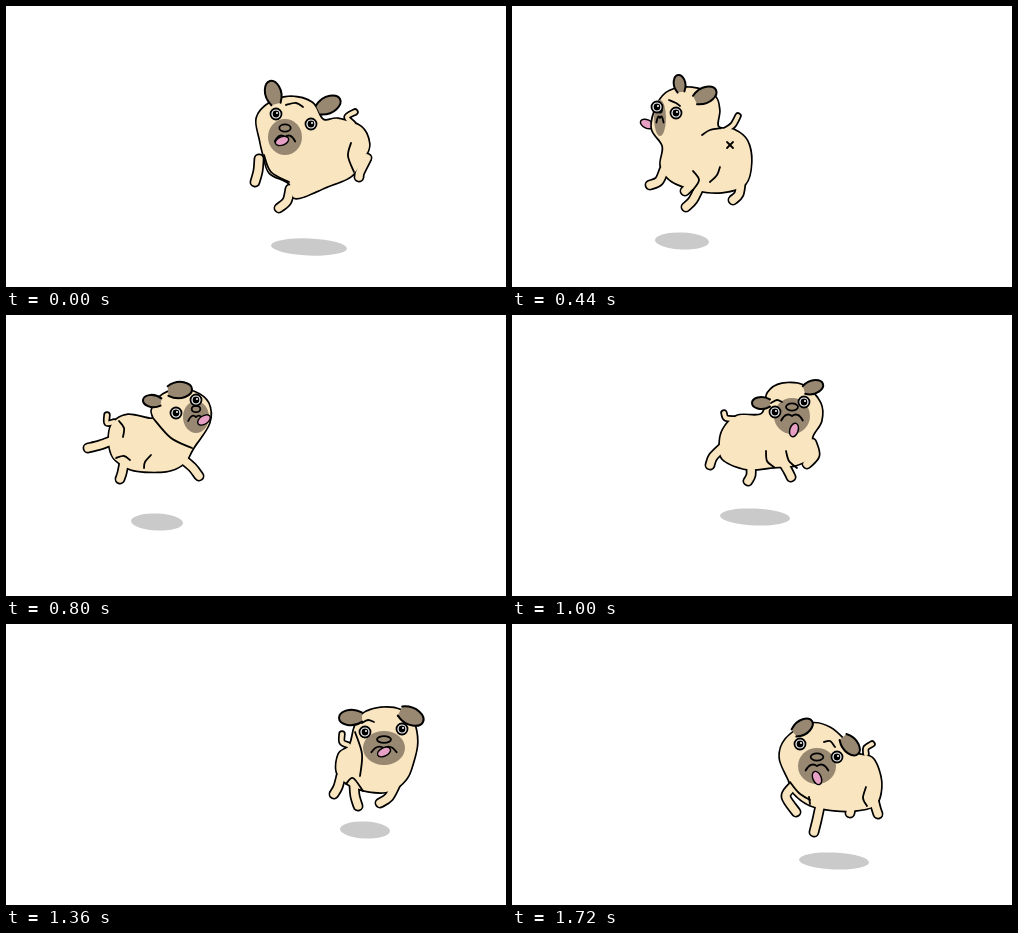
Write an HTML page with a canvas that moves like this. It is 500 px wide and 281 px high and loops after 1800 ms.

```html
<!DOCTYPE html>
<html lang="en">
<head>
<meta charset="utf-8">
<title>Bouncing pug</title>
<style>
html, body { margin: 0; height: 100%; overflow: hidden; background: #fff; }
canvas { display: block; width: 100%; height: 100%; }
</style>
</head>
<body>
<canvas width="500" height="281"></canvas>
<script>
const ctx = document.querySelector('canvas').getContext('2d');
const SKIN = '#f9e6c0', DARK = '#988872', PINK = '#e6a0c4', GREY = '#cacaca';

function paint(fill, width, stroke = '#000') {
  if (fill) { ctx.fillStyle = fill; ctx.fill(); }
  if (width) { ctx.lineWidth = width; ctx.strokeStyle = stroke; ctx.stroke(); }
}

// Smooth curve through the points "x y x y ..."
function trace(text, closed) {
  const n = text.split(' ').map(Number), size = n.length / 2;
  const at = i => {
    const k = closed ? (i + size) % size : Math.max(0, Math.min(size - 1, i));
    return [n[2 * k], n[2 * k + 1]];
  };
  ctx.beginPath();
  ctx.moveTo(...at(0));
  for (let i = 0; i < (closed ? size : size - 1); i++) {
    const [a, b, c, d] = [at(i - 1), at(i), at(i + 1), at(i + 2)];
    ctx.bezierCurveTo(b[0] + (c[0] - a[0]) / 6, b[1] + (c[1] - a[1]) / 6,
      c[0] - (d[0] - b[0]) / 6, c[1] - (d[1] - b[1]) / 6, ...c);
  }
}

function oval(x, y, rx, ry, turn, fill, width) {
  ctx.beginPath();
  ctx.ellipse(x, y, rx, ry, turn, 0, 7);
  paint(fill, width);
}

// Torso and limbs merged into one outlined shape; the last limb is the tail
function body(outline, ...limbs) {
  for (const [color, edge] of [['#000', 3.4], [SKIN, 0]]) {
    limbs.forEach((p, i) => {
      trace(p);
      paint(null, (i < limbs.length - 1 ? 7.5 : 4) + edge, color);
    });
    trace(outline, true);
    paint(color, edge, color);
  }
}

function ear(x, y, tipX, tipY) {
  const dx = tipX - x, dy = tipY - y;
  ctx.beginPath();
  ctx.moveTo(x - dy / 5, y + dx / 5);
  ctx.bezierCurveTo(x + dx / 2 - dy / 2, y + dy / 2 + dx / 2, tipX - dy / 4, tipY + dx / 4, tipX, tipY);
  ctx.bezierCurveTo(tipX + dy / 4, tipY - dx / 4, x + dx / 2 + dy / 2, y + dy / 2 - dx / 2, x + dy / 5, y - dx / 5);
  paint(DARK, 2);
}

function muzzle(x, y, rx, ry) {
  oval(x, y, rx, ry, 0, DARK);
  oval(x, y - ry / 2, rx / 3, ry / 5, 0, DARK, 1.8);
  ctx.beginPath();
  ctx.moveTo(x - rx * 0.6, y + ry / 4);
  ctx.quadraticCurveTo(x - rx / 3, y - ry / 4, x, y);
  ctx.quadraticCurveTo(x + rx / 3, y - ry / 4, x + rx * 0.6, y + ry / 4);
  paint(null, 1.8);
}

const tongue = (x, y, turn) => oval(x, y, 4.2, 7, turn, PINK, 1.4);
const shadow = (x, y, rx) => oval(x, y, rx, 8.5, 0.04, GREY);
const lines = (...all) => all.forEach(p => { trace(p); paint(null, 1.8); });

function eye(x, y) {
  oval(x, y, 5.5, 5.5, 0, '#fff', 1.8);
  oval(x, y, 3.4, 3.4, 0, '#000');
  oval(x + 1, y - 1, 1, 1, 0, '#fff');
}

function leap(drop) {
  shadow(303, 241 + drop, 38);
  body('264 97 251 112 254 133 258 150 264 167 283 177 290 192 322 180 345 170 358 152 363 138 355 121 332 113 317 114 306 97 285 91',
    '253 153 252 165 249 176', '284 183 281 195 273 202', '361 152 354 166 353 171', '347 118 341 111 349 106');
  ear(270, 98, 264, 75);
  ear(312, 104, 334, 93);
  muzzle(279, 131, 17, 18);
  tongue(276, 135, 1.2);
  eye(270, 108);
  eye(305, 118);
  lines('280 99 290 97 297 101', '345 137 342 150 348 166', '258 149 265 166 283 176');
}

function stand(drop) {
  shadow(280, 243 + drop, 32);
  body('228 148 211 168 212 186 225 204 239 226 268 231 296 226 314 226 325 210 325 192 318 177 300 171 277 174 264 152 245 146',
    '242 222 243 234 242 241', '264 226 258 239 251 246', '319 220 320 233 314 240', '300 222 302 234 301 238', '318 178 316 170 319 167');
  ear(230, 151, 211, 157);
  ear(264, 154, 276, 174);
  muzzle(240, 178, 13, 14);
  tongue(238, 193, -0.2);
  eye(230, 169);
  eye(257, 174);
  lines('221 164 227 160 234 162', '248 162 252 158 257 165', '277 220 276 230', '303 207 302 218 307 227');
}

function away(drop) {
  shadow(170, 235 + drop, 27);
  tongue(135, 118, 2);
  body('158 85 146 98 140 122 151 140 149 160 160 175 185 184 210 186 233 178 239 156 235 135 222 124 206 121 207 104 202 90 180 82',
    '152 164 147 175 138 179', '178 180 173 185', '188 180 181 194 174 201', '229 176 227 188 221 194', '214 124 221 119 226 110');
  ear(169, 86, 166, 69);
  ear(183, 94, 204, 84);
  muzzle(148, 112, 6, 18);
  eye(145, 101);
  eye(164, 107);
  lines('157 94 164 97 168 100', '190 129 198 124 209 122', '215 136 221 142', '221 136 215 142', '181 165 187 174 181 184', '208 161 205 169 198 176');
}

function retreat(drop) {
  shadow(151, 207 + drop, 26);
  body('154 82 146 95 146 104 122 100 107 108 103 122 105 137 111 146 128 155 160 156 178 148 187 133 203 108 202 88 188 77 170 75',
    '105 126 94 130 82 133', '118 148 116 158 114 164', '174 142 186 152 193 161', '108 107 101 108 101 100');
  ear(155, 87, 137, 85);
  ear(162, 76, 186, 74);
  muzzle(190, 102, 13, 16);
  tongue(198, 105, 1);
  eye(170, 98);
  eye(190, 85);
  lines('147 103 165 123 186 133', '113 106 118 113 117 122', '145 140 139 147 138 153', '110 143 118 141 124 145');
}

function turn(drop) {
  shadow(243, 202 + drop, 35);
  body('256 78 250 99 225 101 211 115 208 132 212 145 235 154 262 152 284 150 300 140 300 122 309 106 308 88 292 71 270 69',
    '211 132 201 142 198 150', '239 150 239 160 236 166', '270 146 276 156 279 162', '300 128 303 140 295 149', '222 104 214 103 212 98');
  ear(258, 88, 240, 88);
  ear(292, 75, 311, 69);
  muzzle(280, 101, 18, 18);
  tongue(282, 115, 0.3);
  eye(263, 97);
  eye(292, 87);
  lines('259 88 265 85 270 87', '254 136 255 146 262 152', '274 136 277 146 285 153');
}

function front(drop) {
  shadow(359, 206 + drop, 25);
  body('357 90 349 103 344 121 333 130 331 148 342 160 362 167 384 167 400 155 407 138 411 118 407 98 394 86 375 84',
    '335 152 332 163 328 170', '348 160 349 172 352 182', '390 160 383 173 374 179', '342 121 336 118 336 110');
  ear(356, 93, 333, 94);
  ear(394, 87, 417, 98);
  muzzle(378, 124, 21, 17);
  tongue(378, 128, 1.1);
  eye(359, 108);
  eye(396, 105);
  lines('356 99 362 96 368 98', '349 108 356 130 354 152', '340 160 347 154 357 167');
}

function trot(drop) {
  shadow(322, 237 + drop, 35);
  body('297 100 274 115 268 134 277 156 281 168 298 181 322 186 345 186 364 180 369 158 361 135 346 130 337 121 318 104',
    '279 164 274 173 284 188', '308 182 305 196 302 208', '362 176 364 184 366 190', '339 184 338 189', '354 130 354 124 360 120');
  ear(282, 109, 300, 97);
  ear(331, 113, 346, 130);
  muzzle(305, 142, 19, 18);
  tongue(305, 154, -0.4);
  eye(288, 120);
  eye(325, 133);
  lines('312 118 318 117 323 123', '278 158 287 169 298 176', '297 173 298 180', '354 163 351 174 355 182');
}

// Pose, dog offset x and y, shadow offset y
const steps = [
  [leap], [leap, -18, 22, 2], [stand], [stand, -28, -30],
  [away, 22, -3, 3], [away], [away, -38, 33, -8], [retreat, -4, 10, 10],
  [retreat, -8, -10, 4], [retreat], [retreat, 48, 36, -3], [turn],
  [turn, 8, -16], [turn, 14, -6], [front, -48, 22], [front],
  [front, 33, -24, 5], [trot, 62, -22, -10], [trot, 30, 33], [trot]
];

ctx.lineJoin = ctx.lineCap = 'round';

function render() {
  // Each 360 ms hop has four poses, held longest on the ground
  const time = performance.now() % 1800, part = time % 360;
  const step = 4 * Math.floor(time / 360) + (part >= 80) + (part >= 160) + (part >= 280);
  const [pose, dx = 0, dy = 0, shadowY = 0] = steps[step];
  ctx.fillStyle = '#fff';
  ctx.fillRect(0, 0, 500, 281);
  ctx.save();
  ctx.translate(dx, dy);
  pose(shadowY - dy);
  ctx.restore();
  requestAnimationFrame(render);
}
render();
</script>
</body>
</html>
```
